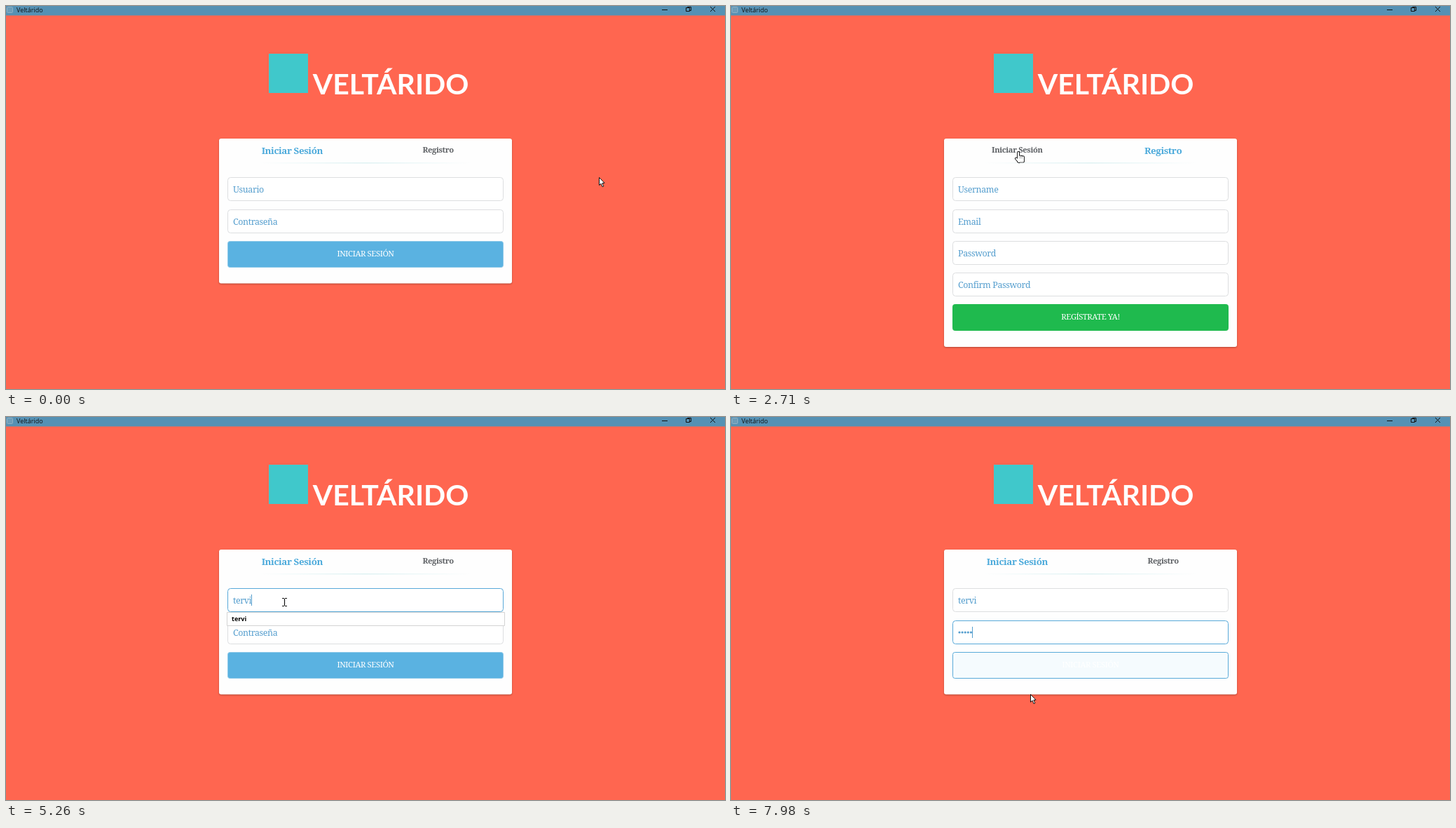
Animation of 1026 by 546 pixels, one loop 8 s. Source, as an HTML page with a canvas:

```html
<!DOCTYPE html>
<html lang="es">
<head>
<meta charset="utf-8">
<title>Veltárido</title>
<style>
  html, body { margin: 0; width: 100%; height: 100%; overflow: hidden; background: #ff6650; }
  canvas { display: block; width: 1026px; height: 546px; }
</style>
</head>
<body>
<canvas id="stage"></canvas>
<script>
const W = 1026, H = 546, LOOP = 8000, FADE = 250;
const canvas = document.getElementById('stage');
const ctx = canvas.getContext('2d');
const ratio = window.devicePixelRatio || 1;
canvas.width = W * ratio;
canvas.height = H * ratio;

const SERIF = '"Noto Serif", serif';
const SANS = '"Open Sans", "Noto Sans", sans-serif';
const WHITE = [255, 255, 255], TINT = [248, 252, 255];
const GREY = [221, 222, 224], BLUE = [88, 169, 217];
const BUTTON = [90, 178, 225], BUTTON_EDGE = [142, 201, 233];
const INK = '#559ece', DARK = '#111';
const USER = 'tervi';

const clamp = v => Math.max(0, Math.min(1, v));
const smooth = u => u * u * (3 - 2 * u);
const mix = (a, b, k) => `rgb(${a.map((v, i) => Math.round(v + (b[i] - v) * k))})`;
// Characters typed by time t at a steady pace.
const typedBy = (t, start, pace) => Math.max(0, Math.min(USER.length, 1 + Math.floor((t - start) / pace)));
// Hover strength for a pointer that enters at `from` and leaves at `to`.
const hover = (t, from, to) =>
  Math.min(clamp((t - from) / FADE), clamp((to - from) / FADE)) * (1 - clamp((t - to) / FADE));
const rowTop = i => Math.round(244.4 + 45.3 * i);

const HOME = { x: 846, y: 244 };
const LEGS = [
  { from: 520, to: 1320, x: 613, y: 210, sag: 30 },
  { from: 1480, to: 1530, x: 611, y: 207 },
  { from: 2210, to: 2710, x: 410, y: 207 },
  { from: 3610, to: 4080, x: 397, y: 264 },
  { from: 7270, to: 7390, x: 425, y: 300 },
  { from: 7420, to: 7930, x: 429, y: 366 },
  { from: 7930, to: 7980, x: 427, y: 395 }
];

function pointer(t) {
  let { x, y } = HOME;
  for (const leg of LEGS) {
    const u = smooth(clamp((t - leg.from) / (leg.to - leg.from)));
    x += (leg.x - x) * u;
    y += (leg.y - y) * u + (leg.sag || 0) * Math.sin(Math.PI * u);
  }
  return [Math.round(x), Math.round(y)];
}

function text(str, x, y, font, color, spacing = 0, align = 'left') {
  ctx.font = font;
  ctx.fillStyle = color;
  ctx.textAlign = align;
  ctx.letterSpacing = spacing + 'px';
  ctx.fillText(str, x, y);
  const width = ctx.measureText(str).width;
  ctx.letterSpacing = '0px';
  return width;
}

function box(x, y, w, h, r, fill, stroke) {
  ctx.beginPath();
  ctx.roundRect(x, y, w, h, r);
  ctx.fillStyle = fill;
  ctx.fill();
  if (stroke) {
    ctx.strokeStyle = stroke;
    ctx.lineWidth = 1;
    ctx.stroke();
  }
}

function line(x1, y1, x2, y2, color = DARK, width = 1) {
  ctx.beginPath();
  ctx.moveTo(x1, y1);
  ctx.lineTo(x2, y2);
  ctx.strokeStyle = color;
  ctx.lineWidth = width;
  ctx.stroke();
}

function drawWindow() {
  ctx.fillStyle = '#ff6650';
  ctx.fillRect(0, 0, W, H);
  ctx.fillStyle = '#5591b4';
  ctx.fillRect(0, 0, W, 13.5);
  box(1.5, 1.5, 8, 8, 1, '#6c9db9', '#8fb0c3');
  text('Veltárido', 15, 9, '9px ' + SANS, DARK);
  line(936, 5.5, 944, 5.5);
  line(1005, 1, 1012, 8);
  line(1012, 1, 1005, 8);
  box(972.5, 1.5, 5, 5, 0, '#5591b4', DARK);
  box(970.5, 2.5, 5, 5, 0, '#5591b4', DARK);

  ctx.fillStyle = '#40c8cb';
  ctx.fillRect(375, 68, 56, 56);
  text('VELTÁRIDO', 549, 126, 'bold 41px Lato, sans-serif', '#fff', 0, 'center');
}

function tab(label, x, active) {
  if (active) text(label, x, 211, 'bold 13.4px ' + SERIF, '#4caadb', -0.42, 'center');
  else text(label, x, 209, 'bold 11.2px ' + SERIF, '#5c5f63', -0.38, 'center');
}

function drawCard(register) {
  ctx.save();
  ctx.shadowColor = 'rgba(60, 10, 0, .4)';
  ctx.shadowBlur = 2.5 * ratio;
  ctx.shadowOffsetY = ratio;
  box(304, 189, 418, register ? 297 : 206.5, 3, '#fefefe');
  ctx.restore();

  tab('Iniciar Sesión', 408.3, !register);
  tab('Registro', 616.6, register);

  const fade = ctx.createLinearGradient(360, 0, 666, 0);
  fade.addColorStop(0, 'rgba(190, 230, 232, 0)');
  fade.addColorStop(0.5, 'rgba(190, 230, 232, .5)');
  fade.addColorStop(1, 'rgba(190, 230, 232, 0)');
  ctx.fillStyle = fade;
  ctx.fillRect(360, 223, 306, 1.5);
}

function field(row, label, glow = 0, tint = 0) {
  const y = rowTop(row);
  box(316.5, y + 0.5, 393, 33, 4, mix(WHITE, TINT, tint), mix(GREY, BLUE, glow));
  return text(label, 324, y + 21.5, '12.4px ' + SERIF, INK, -0.35);
}

function button(y, label, fill, stroke) {
  box(316.5, y + 0.5, 393, 37, 3, fill, stroke);
  text(label, 513, y + 22, '500 11.3px ' + SERIF, '#fff', -0.4, 'center');
}

function caret(x, row) {
  ctx.fillStyle = INK;
  ctx.fillRect(Math.round(x), rowTop(row) + 9, 1, 16);
}

function drawRegister() {
  ['Username', 'Email', 'Password', 'Confirm Password'].forEach((label, i) => field(i, label));
  button(425, 'REGÍSTRATE YA!', '#1fba4e', '#1fba4e');
}

function drawLogin(t) {
  const typed = typedBy(t, 4770, 122), dots = typedBy(t, 6010, 142);
  const userFocus = t >= 4080 && t < 5420, passFocus = t >= 5420;
  const over = Math.max(hover(t, 960, 1050), hover(t, 3820, 7330));
  const width = field(0, USER.slice(0, typed) || 'Usuario', userFocus ? 1 : over, userFocus ? 0 : over);
  if (userFocus && (t < 4620 || typed)) caret(typed ? 324 + width : 324, 0);

  field(1, dots ? '' : 'Contraseña', clamp((t - 5410) / 100));
  ctx.fillStyle = INK;
  for (let i = 0; i < dots; i++) {
    ctx.beginPath();
    ctx.arc(326 + 4.1 * i, 307, 1.6, 0, 7);
    ctx.fill();
  }
  // The caret blinks about half a second after the last key.
  const idle = t - (dots ? 6580 : 5420);
  if (passFocus && (idle < 525 || idle > 1060)) caret(324 + 4 * dots, 1);

  const press = hover(t, 7540, 7975);
  button(335, 'INICIAR SESIÓN', mix(BUTTON, TINT, press), mix(BUTTON_EDGE, BLUE, press));
  if (t >= 4800 && t < 5520) drawSuggestions(t);
}

function drawSuggestions(t) {
  const names = t < 4930 ? [USER, 'teko'] : [USER];
  ctx.globalAlpha = 1 - clamp((t - 5400) / 120);
  box(315.5, 278.5, 396, 19 * names.length, 0, '#fff', '#d3d3d3');
  names.forEach((name, i) => text(name, 322, 291 + 18 * i, 'bold 9px ' + SANS, '#000'));
  ctx.globalAlpha = 1;
}

function drawPointer(t) {
  const [x, y] = pointer(t);
  const inRow = x > 316 && x < 710;
  const within = (top, height) => inRow && y >= top && y < top + height;
  ctx.save();
  ctx.translate(x, y);
  if (within(190, 36) || within(335, 38)) hand();
  else if (within(rowTop(0), 34) || within(rowTop(1), 34)) beam();
  else arrow();
  ctx.restore();
}

function arrow() {
  const shape = new Path2D('M.5 .5V11.5L3 9.2L5 13.7L6.8 13L4.9 8.6L8 8.3Z');
  ctx.fillStyle = '#fff';
  ctx.fill(shape);
  ctx.strokeStyle = DARK;
  ctx.lineWidth = 1;
  ctx.stroke(shape);
}

function beam() {
  line(0.5, -5, 0.5, 5, DARK, 1.2);
  for (const y of [-5.5, 5.5]) {
    line(-3, y, 0, y);
    line(1, y, 4, y);
  }
}

function hand() {
  ctx.lineCap = 'round';
  for (const [color, width] of [[DARK, 4], ['#fff', 2.1]]) {
    for (let i = 0; i < 4; i++) line(2.3 * i, i ? 7 + 0.4 * i : 2, 2.3 * i, 14.5, color, width);
    line(-3, 10.5, 1, 15, color, width);
  }
  ctx.fillStyle = '#fff';
  ctx.fillRect(0, 10.5, 7, 5);
}

function draw(t) {
  const register = t >= 2000 && t < 3340;
  ctx.setTransform(ratio, 0, 0, ratio, 0, 0);
  drawWindow();
  drawCard(register);
  if (register) drawRegister();
  else drawLogin(t);
  drawPointer(t);
}

let begin;
function tick(now) {
  begin ??= now;
  draw((now - begin) % LOOP);
  requestAnimationFrame(tick);
}
draw(0);
requestAnimationFrame(tick);
</script>
</body>
</html>
```
